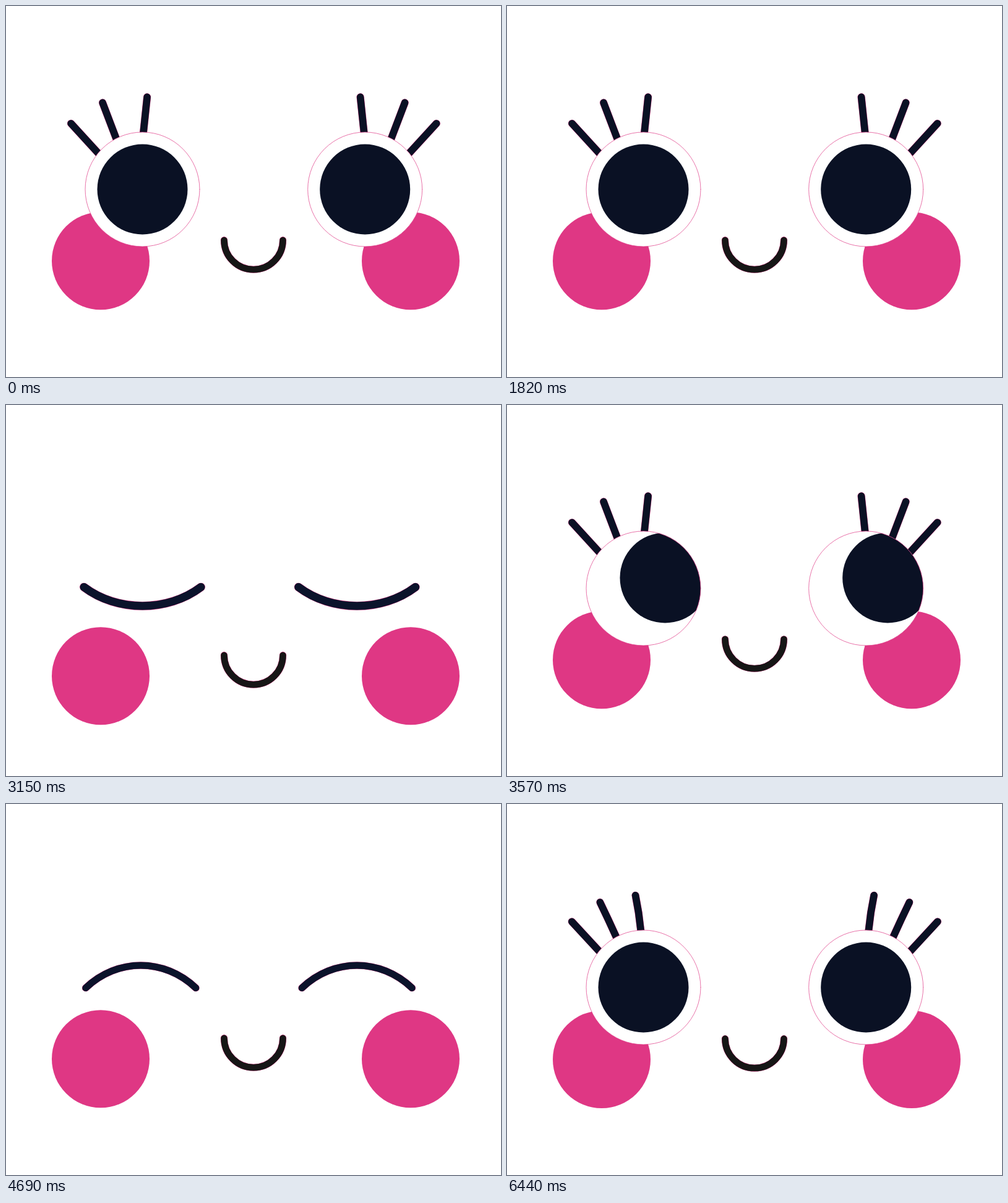
An HTML page with a canvas that plays this animation: 800x600 px, repeating every 6510 ms.

```html
<!DOCTYPE html>
<html lang="en">
<head>
<meta charset="utf-8">
<title>Blinking face</title>
<style>
  html, body { margin: 0; width: 100%; height: 100%; overflow: hidden; background: #fff; }
  canvas { display: block; }
</style>
</head>
<body>
<canvas id="face" width="800" height="600"></canvas>
<script>
const ctx = document.getElementById('face').getContext('2d');
const LOOP = 6510, STEP = 70, FALL = 140;
const NAVY = '#0a1124', INK = '#161616', PINK = '#df3784';
const EYE = { x: 220.5, y: 296.5, r: 92.5, gap: 359.7 };

// Each blink starts closing, then starts opening; gaze is the look after it
const BLINKS = [
  { close: 490, open: 770, gaze: 0 },
  { close: 2030, open: 2310, gaze: -1 },
  { close: 3010, open: 3290, gaze: 1 },
  { close: 3850, open: 6300, gaze: 0 }
];
// Cheeks and mouth sink, then spring back
const SINKS = [
  { from: 2030, to: 2240 },
  { from: 3010, to: 3220 },
  { from: 3850, to: 4165 },
  { from: 5880, to: 6350 }
];
// Degrees from vertical; a higher power keeps the swing for the end of the blink
const LASHES = [
  { root: 50.7, lean: 42.5, length: 65, reach: 55, power: 5 },
  { root: 27.3, lean: 20.8, length: 62, reach: 38, power: 2 },
  { root: -1, lean: -6, length: 57, reach: 44, power: 1 }
];
// Closed lid shapes
const WIDE = { x: 220.5, y: 294.5, sag: 30.5, half: 94.5, width: 13 };
const LOW = { x: 217.5, y: 331.5, sag: 35.5, half: 89.5, width: 11 };
const SMILE = { x: 217.8, y: 297.5, sag: -36.5, half: 89, width: 11 };

const clamp = v => Math.max(0, Math.min(1, v));
const ease = v => { v = clamp(v); return v * v * (3 - 2 * v); };
const ramp = (t, from, span) => ease((t - from) / span);
const spring = u => Math.exp(-u / 60) * Math.cos(Math.PI * u / 200);
const rad = deg => deg * Math.PI / 180;

function mix(a, b, k) {
  const out = {};
  for (const key in a) out[key] = a[key] + (b[key] - a[key]) * k;
  return out;
}

function disc(x, y, r, color) {
  ctx.beginPath();
  ctx.arc(x, y, r, 0, Math.PI * 2);
  ctx.fillStyle = color;
  ctx.fill();
}

function line(width, color) {
  ctx.lineWidth = width;
  ctx.strokeStyle = color;
  ctx.stroke();
}

function outlined(width, color) {
  line(width + .7, PINK);
  line(width, color);
}

// 0 is nearly shut, 1 just popped open, 3 at rest
function lidAt(t, blink) {
  if (!blink) return 3;
  if (t < blink.open) return 3 * (1 - clamp((t - blink.close) / FALL)) ** 2;
  return Math.min(3, (t - blink.open) / 70);
}

function sinkAt(t) {
  const s = SINKS.filter(s => t >= s.from).pop();
  if (!s) return 0;
  return t < s.to ? clamp((t - s.from) / FALL) ** 2 : spring(t - s.to);
}

function drawLash(lash, lid, rx, ry, y) {
  const swing = lash.reach * (1 - lid / 3) ** lash.power;
  const root = rad(lash.root + swing / 4), lean = rad(lash.lean + swing);
  const bx = -rx * Math.sin(root), by = y - ry * Math.cos(root);
  const dx = -lash.length * Math.sin(lean), dy = -lash.length * Math.cos(lean);
  const bow = swing / 10;
  ctx.beginPath();
  ctx.moveTo(bx, by);
  ctx.quadraticCurveTo(bx + dx / 2 + bow, by + dy / 2 - bow / 2, bx + dx, by + dy);
  outlined(11.5, NAVY);
}

function openEye(x, lid, gaze, side) {
  const shut = Math.max(0, 1 - lid), pop = Math.max(0, 1 - Math.abs(lid - 1));
  const ry = EYE.r * (1 - .68 * shut) + 2 * pop;
  const y = EYE.y + 7 * shut;

  ctx.save();
  ctx.translate(x, 0);
  ctx.scale(side, 1);
  for (const lash of LASHES) drawLash(lash, lid, EYE.r, ry, y);
  ctx.restore();

  const ball = new Path2D();
  ball.ellipse(x, y, EYE.r, ry, 0, 0, Math.PI * 2);
  ctx.fillStyle = '#fff';
  ctx.fill(ball);
  ctx.save();
  ctx.clip(ball);
  disc(x + 35 * gaze, y - 17 * Math.abs(gaze), 73, NAVY);
  ctx.restore();
  ctx.lineWidth = .7;
  ctx.strokeStyle = PINK;
  ctx.stroke(ball);
}

function closedEye(x, { y, sag, half, width }) {
  const cy = y + sag * 4 / 3;
  ctx.beginPath();
  ctx.moveTo(x - half, y);
  ctx.bezierCurveTo(x - half * .43, cy, x + half * .43, cy, x + half, y);
  outlined(width, '#0b132b');
}

function draw(t) {
  ctx.fillStyle = '#fff';
  ctx.fillRect(0, 0, 800, 600);
  ctx.lineCap = 'round';

  const y = 412.2 + 26 * sinkAt(t);
  disc(153, y, 79, PINK);
  disc(654, y, 79, PINK);

  const blink = BLINKS.filter(b => t >= b.close).pop();
  const shut = blink ? blink.close + FALL : LOOP;
  if (t >= shut && t < blink.open) {
    const lowered = ease(Math.min(t - shut, blink.open - 70 - t) / FALL);
    const smile = ramp(t, 4130, FALL) - ramp(t, 5880, FALL);
    const lid = mix(mix(WIDE, LOW, lowered), SMILE, smile);
    closedEye(lid.x, lid);
    closedEye(567.2, lid);
  } else {
    // The gaze changes while the eyes are shut
    const seen = BLINKS.filter(b => t >= b.open).pop();
    const lid = lidAt(t, blink), gaze = seen ? seen.gaze : 0;
    openEye(EYE.x, lid, gaze, 1);
    openEye(EYE.x + EYE.gap, lid, gaze, -1);
  }

  ctx.beginPath();
  ctx.arc(400, y - 33.5, 47.5, Math.PI, 0, true);
  outlined(10.5, INK);
}

const start = performance.now();
function tick() {
  const t = (performance.now() - start) % LOOP;
  draw(Math.floor(t / STEP) * STEP);
  requestAnimationFrame(tick);
}
tick();
</script>
</body>
</html>
```
